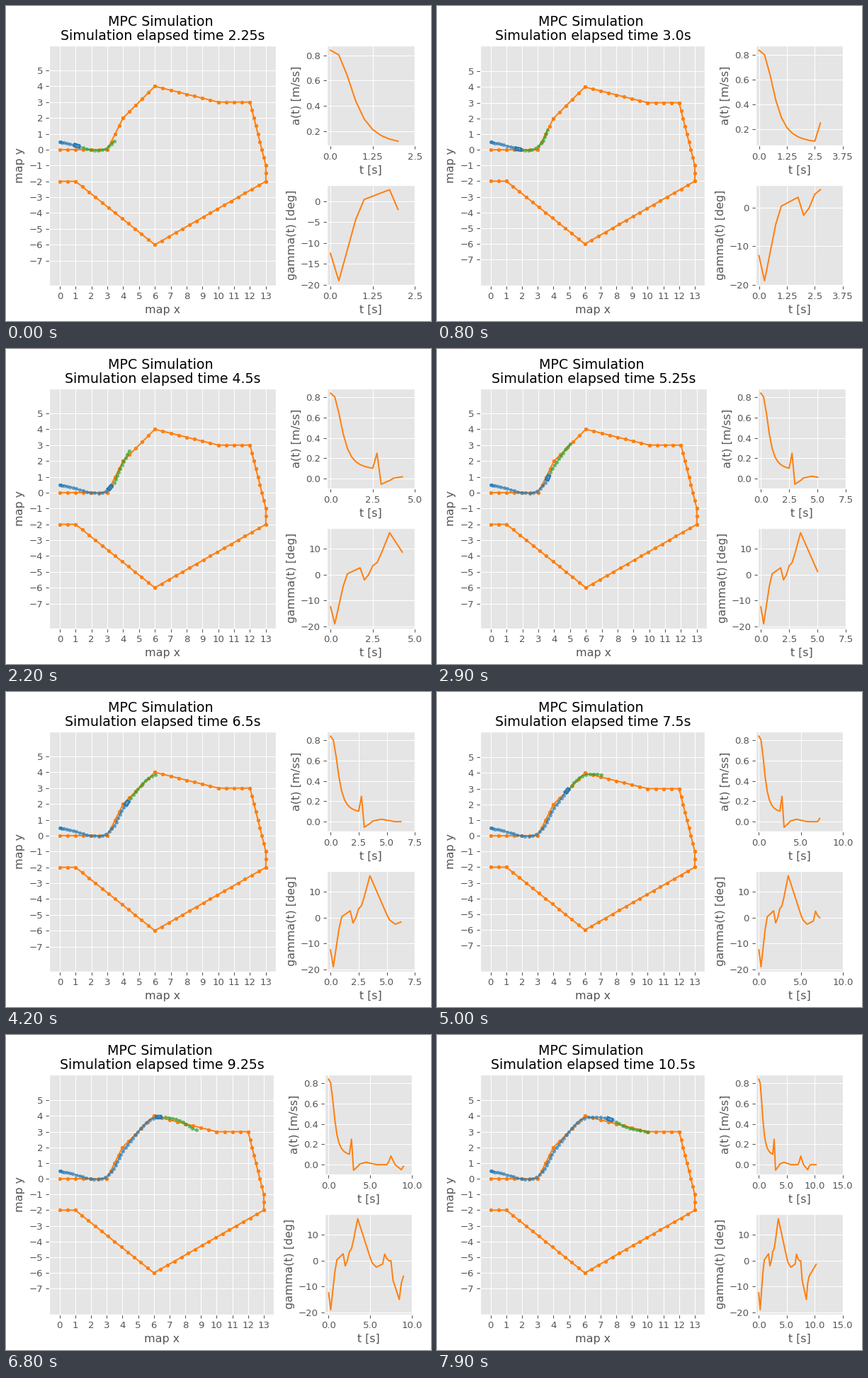
Recreate the animation shown at these times as a matplotlib script. Size 600 by 445 pixels, loop 8000 ms.

```python
import numpy as np
import matplotlib.pyplot as plt
from matplotlib.animation import FuncAnimation

WIDTH, HEIGHT, DPI = 600, 445, 95
FRAMES, INTERVAL = 80, 100
DT = 0.25            # simulated seconds per step
FIRST = 9            # steps already done when the loop starts
TOTAL = 42
HORIZON = 10         # predicted points
CAR_L, CAR_W = 0.35, 0.2

# Plot area in pixels
LEFT, RIGHT, TOP, BOTTOM = 61.3, 577.3, 56, 394.6
COL_GAP, ROW_GAP = 71.8, 55.6
LABEL_SHIFT = 4.5    # room taken by a four-character last tick label

CORNERS = np.array([(0, 0), (3, 0), (4, 2), (6, 4), (10, 3), (12, 3),
                    (13, -1), (13, -2), (6, -6), (1, -2), (0, -2)], float)
DRIVEN = np.array([(0, .5), (1, .26), (2, 0), (2.8, .04), (3.45, .65), (3.97, 1.65),
                   (5, 3.02), (5.7, 3.73), (6.55, 3.94), (7.7, 3.75), (8.8, 3.24),
                   (10.3, 2.97)])


def subdivide(corners, step=0.5):
    parts = []
    for a, b in zip(corners[:-1], corners[1:]):
        n = int(np.hypot(*(b - a)) / step)
        parts.append(a + (b - a) * np.linspace(0, 1, n + 1)[:, None])
    return np.vstack(parts)


def catmull_rom(pts, n=40):
    p = np.vstack([2 * pts[0] - pts[1], pts, 2 * pts[-1] - pts[-2]])
    u = np.linspace(0, 1, n, endpoint=False)[:, None]
    parts = [0.5 * (2 * b + (c - a) * u + (2 * a - 5 * b + 4 * c - d) * u**2
                    + (3 * b - a - 3 * c + d) * u**3)
             for a, b, c, d in zip(p, p[1:], p[2:], p[3:])]
    return np.vstack(parts + [pts[-1:]])


step_no = np.arange(TOTAL)


def bump(peak, height, rise, fall):
    """Pulse with straight flanks, in steps."""
    return np.interp(step_no, [peak - rise, peak, peak + fall], [0, height, 0])


# Acceleration: start-up decay, then small corrections in the bends
launch = 0.08 + 0.76 / (1 + (step_no * DT / 0.72) ** 2.8)
accel = (np.where(step_no < 11, launch, 0)
         + bump(11, .25, 1, 1) + bump(12, -.055, 1, 3) + bump(18, .024, 4, 5)
         + bump(30, .085, 1.6, 1.9) + bump(35, -.05, 3, 1.5))

# Steering: one pulse per correction
gamma = (bump(1, -19, 2.9, 2.6) + bump(7, 2.7, 3.5, 1) + bump(8, -2, 1, 1.2)
         + bump(10, 3.5, 1.1, 1.2) + bump(14, 16.3, 4, 6.5) + bump(23, -2.5, 3, 6)
         + bump(27, 3.4, 1, 1.6) + bump(31, -3.8, 1, 3) + bump(34, -15, 4, 1.6)
         + bump(36, -6, 2, 6.5))

track = subdivide(CORNERS)
curve = catmull_rom(DRIVEN)
arc = np.append(0, np.cumsum(np.hypot(*np.diff(curve, axis=0).T)))
speed = np.append(0, np.cumsum(accel) * DT)[:-1]
travel = np.cumsum(speed) * DT


def along(s):
    return np.array([np.interp(s, arc, curve[:, 0]), np.interp(s, arc, curve[:, 1])])


def heading(s):
    dx, dy = along(s + 0.05) - along(s - 0.05)
    return np.arctan2(dy, dx)


def car_outline(s):
    """Box whose front edge sits at the current position."""
    c, r = np.cos(heading(s)), np.sin(heading(s))
    box = np.array([[-CAR_L, 0, 0, -CAR_L, -CAR_L],
                    [CAR_W / 2, CAR_W / 2, -CAR_W / 2, -CAR_W / 2, CAR_W / 2]])
    return np.array([[c, -r], [r, c]]) @ box + along(s)[:, None]


def prediction(s, steer):
    """Points ahead, swinging to the side the wheels are turned to."""
    j = np.arange(1, HORIZON + 1)
    ahead = s + 0.24 * j
    yaw = heading(ahead)
    swing = 0.028 * steer * (j / HORIZON) ** 2
    return along(ahead) + swing * np.array([-np.sin(yaw), np.cos(yaw)])


plt.style.use("ggplot")
# The sliver of extra size guards against rounding down a pixel
fig = plt.figure(figsize=((WIDTH + 0.01) / DPI, (HEIGHT + 0.01) / DPI), dpi=DPI)
grid = fig.add_gridspec(2, 3)

ax_map = fig.add_subplot(grid[:, :2])
ax_map.plot(*track.T, c="tab:orange", marker=".")
trail, = ax_map.plot([], [], c="tab:blue", marker=".", alpha=0.5)
plan, = ax_map.plot([], [], c="tab:green", marker=".", alpha=0.5)
car, = ax_map.plot([], [], c="tab:blue")
ax_map.set_xlabel("map x")
ax_map.set_ylabel("map y")
ax_map.set_xticks(range(14))
ax_map.set_yticks(range(-7, 6))
ax_map.set_xlim(-0.65, 13.65)


def history_plot(cell, label):
    ax = fig.add_subplot(cell)
    ax.set_xlabel("t [s]")
    ax.set_ylabel(label)
    line, = ax.plot([], [], c="tab:orange")
    return ax, line


charts = [history_plot(grid[0, 2], "a(t) [m/ss]") + (accel,),
          history_plot(grid[1, 2], "gamma(t) [deg]") + (gamma,)]


def time_ticks(last):
    gap = next(g for g in (5, 10, 20) if 1.1 * last <= 3 * g)
    return np.arange(0, int(np.ceil(1.05 * last / gap)) + 1) * gap


def update_chart(ax, line, values, ticks, labels):
    last = len(values) - 1
    line.set_data(np.arange(last + 1), values)
    ax.set_xticks(ticks, labels=labels)
    ax.set_xlim(-0.05 * last, ticks[-1])
    pad = 0.05 * np.ptp(values)
    ax.set_ylim(values.min() - pad, values.max() + pad)


def arrange(last_label):
    """Fit the plots beside the last tick label; keep map units square."""
    right = RIGHT - LABEL_SHIFT * (len(last_label) > 3)
    col = (right - LEFT - 2 * COL_GAP) / 3
    row = (BOTTOM - TOP - ROW_GAP) / 2
    fig.subplots_adjust(left=LEFT / WIDTH, right=right / WIDTH,
                        top=1 - TOP / HEIGHT, bottom=1 - BOTTOM / HEIGHT,
                        wspace=COL_GAP / col, hspace=ROW_GAP / row)
    half = 7.15 * (BOTTOM - TOP) / (2 * col + COL_GAP)
    ax_map.set_ylim(-1 - half, -1 + half)


def update(i):
    steps = FIRST + (5 * i + 3) // 12
    s = travel[steps - 1]
    trail.set_data(*along(travel[:steps]))
    plan.set_data(*prediction(s, gamma[steps - 1]))
    car.set_data(*car_outline(s))
    ax_map.set_title(f"MPC Simulation \nSimulation elapsed time {steps * DT}s",
                     linespacing=1.1)

    ticks = time_ticks(steps - 1)
    labels = [str(t) for t in ticks * DT]
    for ax, line, values in charts:
        update_chart(ax, line, values[:steps], ticks, labels)
    arrange(labels[-1])
    return trail, plan, car


anim = FuncAnimation(fig, update, frames=FRAMES, interval=INTERVAL,
                     repeat=True, repeat_delay=0)
plt.show()
```
